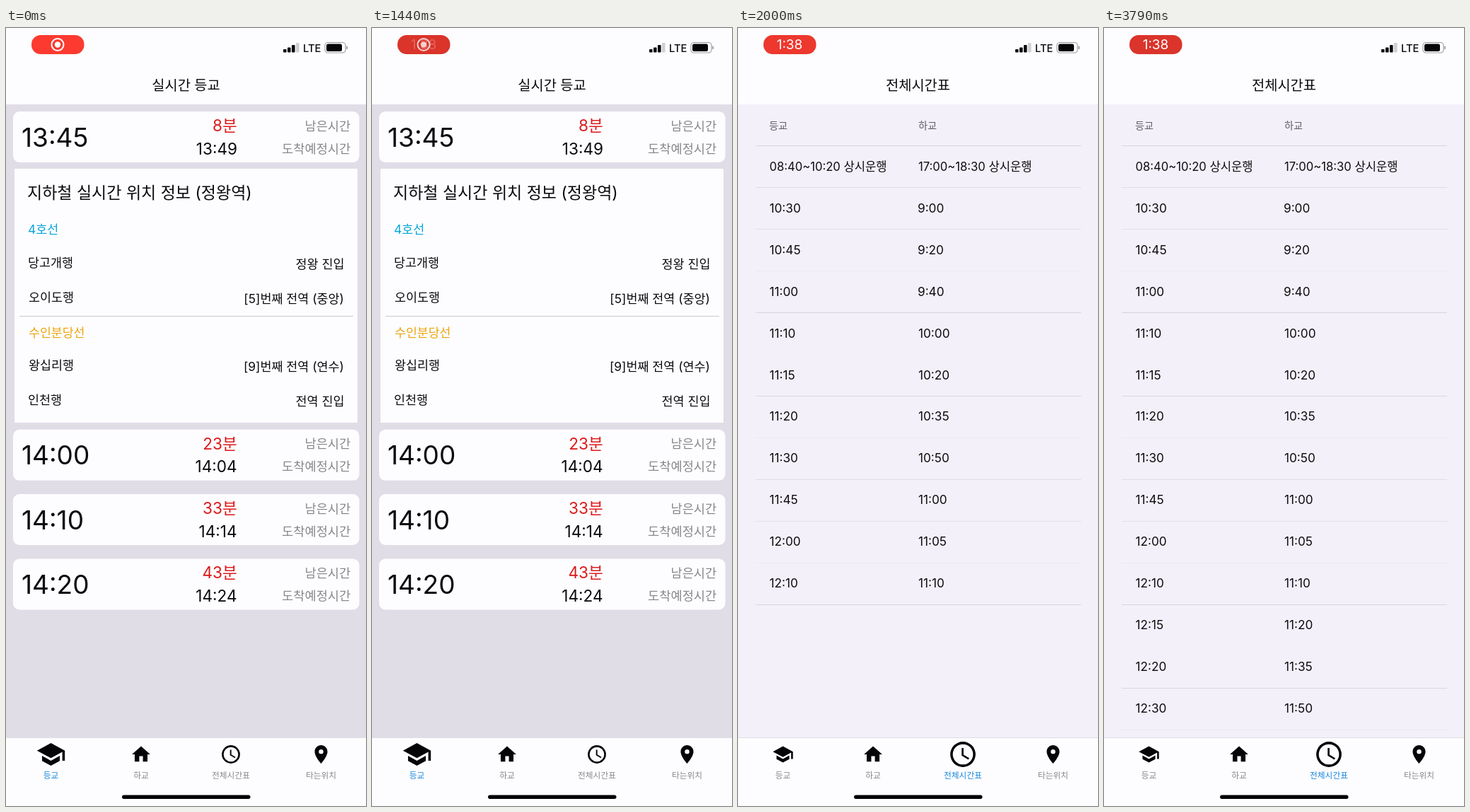
Animation of 509 by 1100 pixels, one loop 3840 ms. Source, as an HTML page with a canvas:

```html
<!DOCTYPE html>
<html lang="ko">
<head>
<meta charset="utf-8">
<title>실시간 등교</title>
<style>
html, body { margin: 0; width: 100%; height: 100%; overflow: hidden; background: #fdfdff; }
canvas { display: block; width: 509px; height: 1100px; }
</style>
</head>
<body>
<canvas id="stage"></canvas>
<script>
const W = 509, H = 1100, LOOP = 3840;
const TAB_AT = 1500, TABLE_AT = 2000, FULL_AT = 2020;
const WHITE = '#fdfdff', INK = '#0b0b0d', GREY = '#87878b', BLUE = '#1485dc', RED = '#dd1b1c';
const FONT = "Inter, 'Noto Sans CJK KR', 'Noto Sans CJK', sans-serif";

const canvas = document.getElementById('stage');
const ctx = canvas.getContext('2d');
const dpr = window.devicePixelRatio || 1;
canvas.width = W * dpr;
canvas.height = H * dpr;

const clamp = v => Math.max(0, Math.min(1, v));
const smooth = v => { v = clamp(v); return v * v * (3 - 2 * v); };

// Left and right alignment refer to the edge of the ink.
function text(s, x, y, size, color = INK, align = 'left', weight = 400) {
  ctx.font = `${weight} ${size}px ${FONT}`;
  ctx.textAlign = align;
  ctx.fillStyle = color;
  const m = ctx.measureText(s);
  if (align === 'left') x += m.actualBoundingBoxLeft;
  if (align === 'right') x -= m.actualBoundingBoxRight;
  ctx.fillText(s, x, y);
}

function rect(x, y, w, h, color) {
  ctx.fillStyle = color;
  ctx.fillRect(x, y, w, h);
}

function round(x, y, w, h, r, color) {
  ctx.beginPath();
  ctx.roundRect(x, y, w, h, r);
  ctx.fillStyle = color;
  ctx.fill();
}

const tabs = [
  { x: 63.5, label: '등교', icon: 'M5 13.18v4L12 21l7-3.82v-4L12 17l-7-3.82zM12 3L1 9l11 6 9-4.91V17h2V9L12 3z' },
  { x: 191, label: '하교', icon: 'M10 20v-6h4v6h5v-8h3L12 3 2 12h3v8z' },
  { x: 318, label: '전체시간표', icon: 'M12 2a10 10 0 1 0 0 20a10 10 0 1 0 0-20zM12 4a8 8 0 1 1 0 16a8 8 0 1 1 0-16zM12.5 7H11v6l5.25 3.15.75-1.23-4.5-2.67z' },
  { x: 445.5, label: '타는위치', icon: 'M12 2C8.13 2 5 5.13 5 9c0 5.25 7 13 7 13s7-7.75 7-13c0-3.87-3.13-7-7-7zm0 4.5a2.5 2.5 0 1 1 0 5a2.5 2.5 0 1 1 0-5z' }
].map(t => ({ ...t, path: new Path2D(t.icon) }));

function tabBar(active) {
  rect(0, 1003, W, 97, WHITE);
  rect(0, 1003, W, 1, '#e0dfe4');
  tabs.forEach((t, i) => {
    const scale = i === active ? 1.79 : 1.29;
    ctx.save();
    ctx.translate(t.x, 1027);
    ctx.scale(scale, scale);
    ctx.translate(-12, -12);
    ctx.fillStyle = '#050507';
    ctx.fill(t.path, 'evenodd');
    ctx.restore();
    text(t.label, t.x, 1061, 11.7, i === active ? BLUE : GREY, 'center');
  });
  round(164, 1084.5, 181.5, 5.5, 2.75, '#050507');
}

function recordPill(t) {
  const p = ((1 + Math.cos((t + 170) / 2640 * 2 * Math.PI)) / 2) ** 2;
  const mix = (a, b) => Math.round(a + (b - a) * p);
  round(36, 10, 74.5, 27, 13, `rgb(${mix(218, 255)},${mix(52, 59)},${mix(43, 48)})`);

  const k = smooth((t - 1150) / 900);
  ctx.globalAlpha = 1 - k;
  ctx.strokeStyle = ctx.fillStyle = '#fff';
  ctx.lineWidth = 2;
  ctx.beginPath();
  ctx.arc(73, 23.5, 8.5, 0, 7);
  ctx.stroke();
  ctx.beginPath();
  ctx.arc(73, 23.5, 4.2, 0, 7);
  ctx.fill();
  ctx.globalAlpha = k;
  text('1:38', 73, 30.2, 19, '#fff', 'center');
  ctx.globalAlpha = 1;
}

function statusBar(t, title) {
  rect(0, 0, W, 108, WHITE);
  recordPill(t);
  [4.5, 7, 10.5, 13.5].forEach((h, i) =>
    round(392 + i * 6, 34.5 - h, 4.6, h, 1, i < 3 ? INK : '#d0cfd4'));
  text('LTE', 421, 33.7, 14.7, INK, 'left', 500);
  ctx.beginPath();
  ctx.roundRect(451, 20.5, 29, 14.5, 4);
  ctx.strokeStyle = '#98989c';
  ctx.lineWidth = 1.1;
  ctx.stroke();
  round(453, 22.5, 22, 10.5, 2.5, '#050507');
  round(481.3, 25.5, 1.6, 4.8, 0.8, '#98989c');
  text(title, W / 2, 88, 19.8, INK, 'center', 500);
}

function busCard(y, start, left, arrive) {
  round(10, y, 489.5, 72, 9, WHITE);
  text(start, 23, y + 49.5, 37);
  text(left, 326, y + 28, 22.6, RED, 'right');
  text(arrive, 326, y + 60.5, 22.6, INK, 'right');
  text('남은시간', 487, y + 26.5, 17.6, GREY, 'right');
  text('도착예정시간', 487, y + 58.5, 17.6, GREY, 'right');
}

function trainRow(name, state, y) {
  text(name, 32, y, 17.4);
  text(state, 476.5, y + 1.7, 17.4, INK, 'right');
}

function livePage() {
  rect(0, 108, W, 895, '#e1dde7');
  busCard(118, '13:45', '8분', '13:49');
  rect(12, 199, 485, 359, WHITE);
  text('지하철 실시간 위치 정보 (정왕역)', 31, 241.3, 23);
  text('4호선', 32, 290.5, 17.4, '#06a6da');
  trainRow('당고개행', '정왕 진입', 338);
  trainRow('오이도행', '[5]번째 전역 (중앙)', 387);
  rect(19, 407, 472, 1, '#cac9ce');
  text('수인분당선', 32, 437.3, 17.3, '#eda50f');
  trainRow('왕십리행', '[9]번째 전역 (연수)', 483);
  trainRow('인천행', '전역 진입', 532);
  busCard(567.8, '14:00', '23분', '14:04');
  busCard(659, '14:10', '33분', '14:14');
  busCard(750.4, '14:20', '43분', '14:24');
}

const toSchool = ('08:40~10:20 상시운행,10:30,10:45,11:00,11:10,11:15,11:20,' +
  '11:30,11:45,12:00,12:10,12:15,12:20,12:30').split(',');
const toHome = ('17:00~18:30 상시운행,9:00,9:20,9:40,10:00,10:20,10:35,' +
  '10:50,11:00,11:05,11:10,11:20,11:35,11:50').split(',');
// Hairlines fall between pixels, so their strength repeats every seven rows.
const hairline = [0.7, 0.6, 0.25, 1, 0.08, 0.9, 0.3];

function rule(y, alpha) {
  ctx.globalAlpha = alpha;
  rect(25, y, 460, 1, '#d8d4df');
  ctx.globalAlpha = 1;
}

function tablePage(rows) {
  rect(0, 108, W, 895, '#f4f0fa');
  text('등교', 44, 143, 14.2, '#5e5d64');
  text('하교', 255, 143, 14.2, '#5e5d64');
  rule(166, 1);
  for (let i = 0; i < rows; i++) {
    const y = 202 + i * 58.9, size = i ? 17.2 : 16.6;
    text(toSchool[i], 44.5, y, size);
    text(toHome[i], 255, y, size);
    rule(Math.round(225 + i * 58.97), hairline[i % 7]);
  }
}

function loadingPage() {
  rect(0, 108, W, 895, '#e1dde7');
  text('Loading...', W / 2, 561, 16.8, INK, 'center');
}

function draw(t) {
  ctx.setTransform(dpr, 0, 0, dpr, 0, 0);
  if (t < TAB_AT) livePage();
  else if (t < TABLE_AT) loadingPage();
  else tablePage(t < FULL_AT ? 11 : 14);
  statusBar(t, t < TAB_AT ? '실시간 등교' : '전체시간표');
  tabBar(t < TAB_AT ? 0 : 2);
}

const began = performance.now();
function tick() {
  draw((performance.now() - began) % LOOP);
  requestAnimationFrame(tick);
}
tick();
</script>
</body>
</html>
```
